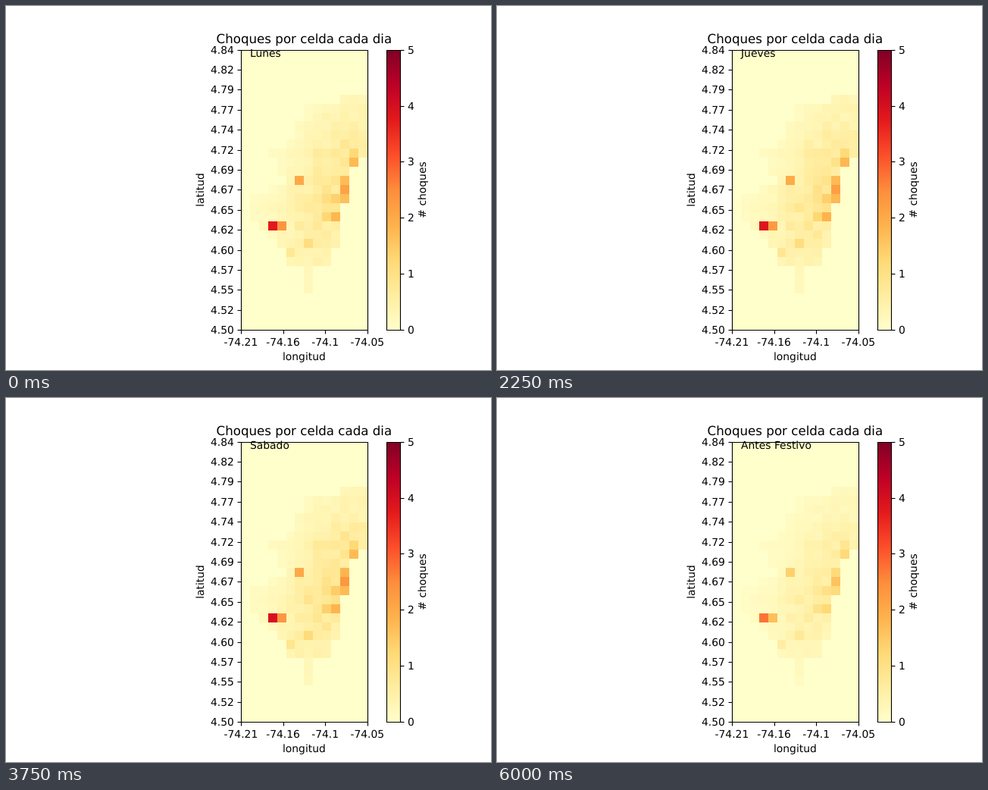
Recreate the animation shown at these times as an HTML page. Size 640 px wide and 480 px high, loop 6750 ms.

```html
<!DOCTYPE html>
<html lang="es">
<head>
<meta charset="utf-8">
<title>Choques por celda</title>
<style>
  html, body { margin: 0; width: 100%; height: 100%; overflow: hidden; background: #fff; }
  svg { display: block; width: 640px; height: 480px; }
  text { font: 13.89px "DejaVu Sans", sans-serif; text-rendering: geometricPrecision; }
  .title { font-size: 16.67px; }
  .line { fill: none; stroke: #000; stroke-width: 1.11; }
  .mid { text-anchor: middle; }
</style>
</head>
<body>
<svg viewBox="0 0 640 480">
  <defs><linearGradient id="scale" x1="0" y1="1" x2="0" y2="0"></linearGradient></defs>
  <g id="cells" shape-rendering="crispEdges"></g>
  <rect x="502" y="58" width="19" height="370" fill="url(#scale)"/>
  <g id="axes"></g>
</svg>
<script>
const STEP = 750, COLS = 14, ROWS = 31, MAX = 5;
const LEFT = 309.9, WIDTH = 166.9, TOP = 57.6, HEIGHT = 369.6;
const palette = ['#ffffcc', '#ffeda0', '#fed976', '#feb24c', '#fd8d3c',
  '#fc4e2a', '#e31a1c', '#bd0026', '#800026'];

// Each day with its share of a normal day's crashes.
const days = [['Lunes', 1], ['Martes', 0.97], ['Miercoles', 1], ['Jueves', 1.02],
  ['Viernes', 1.04], ['Sabado', 1.05], ['Domingo', 0.72], ['Festivo', 0.7],
  ['Antes Festivo', 0.72]];

// Outline of the city: key points as [row, column], joined by straight lines.
const west = [[5, 11], [6, 7], [10, 5], [11, 3], [14, 5], [16, 1], [18, 1],
  [21, 4], [23, 5], [24, 7], [26, 7]];
const east = [[5, 13], [11, 13], [13, 11], [16, 11], [17, 10], [20, 10],
  [23, 9], [24, 7], [26, 7]];

// Busy cells: column, row, crashes on a normal day.
const busy = [[3, 19, 3.9], [4, 19, 2.3], [6, 14, 2], [11, 14, 1.7], [11, 15, 2.2],
  [11, 16, 1.7], [10, 16, 1.4], [10, 18, 1.8], [9, 18, 1.3], [12, 12, 1.7],
  [12, 11, 1.2], [7, 21, 1.1], [5, 22, 0.8]];

function between(points, row) {
  const i = points.findIndex(([r]) => r >= row);
  const [r1, c1] = points[i], [r0, c0] = points[Math.max(i - 1, 0)];
  return Math.round(r1 === r0 ? c1 : c0 + (c1 - c0) * (row - r0) / (r1 - r0));
}

function rand(c, r, seed) {
  const n = Math.sin(c * 12.9898 + r * 78.233 + seed * 37.719) * 43758.5453;
  return n - Math.floor(n);
}
const vary = (amount, ...seed) => 1 + amount * (2 * rand(...seed) - 1);

// Crashes thin out away from a ridge running from north-east to south-west.
function density(c, r) {
  const ridge = 12 - 0.27 * (r - 6);
  const spread = ((r - 15) / 8) ** 2 + ((c - ridge) / 4) ** 2;
  return (0.14 + 0.72 * Math.exp(-spread)) * vary(0.25, c, r, 0);
}

function count({ c, r, peak, base }, day) {
  return (peak || base) * days[day][1] * vary(peak ? 0.04 : 0.12, c, r, day + 1);
}

const rgb = hex => [1, 3, 5].map(i => parseInt(hex.slice(i, i + 2), 16));
function colour(value) {
  const p = Math.min(value / MAX, 1) * (palette.length - 1);
  const i = Math.min(Math.floor(p), palette.length - 2);
  const a = rgb(palette[i]), b = rgb(palette[i + 1]);
  return `rgb(${a.map((v, k) => Math.round(v + (b[k] - v) * (p - i)))})`;
}

function add(parent, tag, attrs, text) {
  const el = document.createElementNS('http://www.w3.org/2000/svg', tag);
  for (const k in attrs) el.setAttribute(k, attrs[k]);
  if (text !== undefined) el.textContent = text;
  return parent.appendChild(el);
}

const cellLayer = document.getElementById('cells');
const axes = document.getElementById('axes');
const edgeX = c => Math.round(LEFT + c * WIDTH / COLS);
const edgeY = r => Math.round(57.1 + r * HEIGHT / ROWS);

palette.forEach((c, i) => add(document.getElementById('scale'), 'stop',
  { offset: i / (palette.length - 1), 'stop-color': c }));

add(cellLayer, 'rect', { x: 310, y: 58, width: 167, height: 369, fill: palette[0] });
const cells = [];
for (let r = west[0][0]; r <= west.at(-1)[0]; r++) {
  for (let c = between(west, r); c <= between(east, r); c++) {
    const x = edgeX(c), y = edgeY(r);
    const el = add(cellLayer, 'rect', { x, y, width: edgeX(c + 1) - x, height: edgeY(r + 1) - y });
    const peak = busy.find(b => b[0] === c && b[1] === r)?.[2];
    cells.push({ c, r, el, peak, base: density(c, r) });
  }
}

const line = d => add(axes, 'path', { d, class: 'line' });
const label = (x, y, text, cls = '') => add(axes, 'text', { x, y, class: cls }, text);
const sideLabel = (x, text) => add(axes, 'text',
  { transform: `translate(${x} 242.5) rotate(-90)`, class: 'mid' }, text);
const snap = v => Math.round(v) + 0.5;

line('M310.5 58.5H477.5V427.5H310.5Z');
line('M502.5 58.5H520.5V427.5H502.5Z');

for (let i = 0; i <= 14; i++) {
  const y = TOP + i * HEIGHT / 14;
  line(`M310.5 ${snap(y)}h-5`);
  label(270, Math.round(y + 5), (4.84 - i * 0.34 / 14).toFixed(2));
}
for (let i = 0; i <= 3; i++) {
  const x = LEFT + i * WIDTH / 3;
  line(`M${snap(x)} 427.5v5`);
  label(x, 448, +(-74.21 + i * 0.16 / 3).toFixed(2), 'mid');
}
for (let i = 0; i <= MAX; i++) {
  const y = TOP + HEIGHT * (1 - i / MAX);
  line(`M520.5 ${snap(y)}h5`);
  label(530, Math.round(y + 5), i);
}
label(393.4, 49, 'Choques por celda cada dia', 'title mid');
label(393.4, 467, 'longitud', 'mid');
sideLabel(261, 'latitud');
sideLabel(554, '# choques');
const dayLabel = label(322, 67, '');

let shown = -1;
function show(day) {
  if (day === shown) return;
  shown = day;
  dayLabel.textContent = days[day][0];
  for (const cell of cells) cell.el.setAttribute('fill', colour(count(cell, day)));
}

const start = performance.now();
function tick() {
  show(Math.floor((performance.now() - start) / STEP) % days.length);
  requestAnimationFrame(tick);
}
tick();
</script>
</body>
</html>
```
